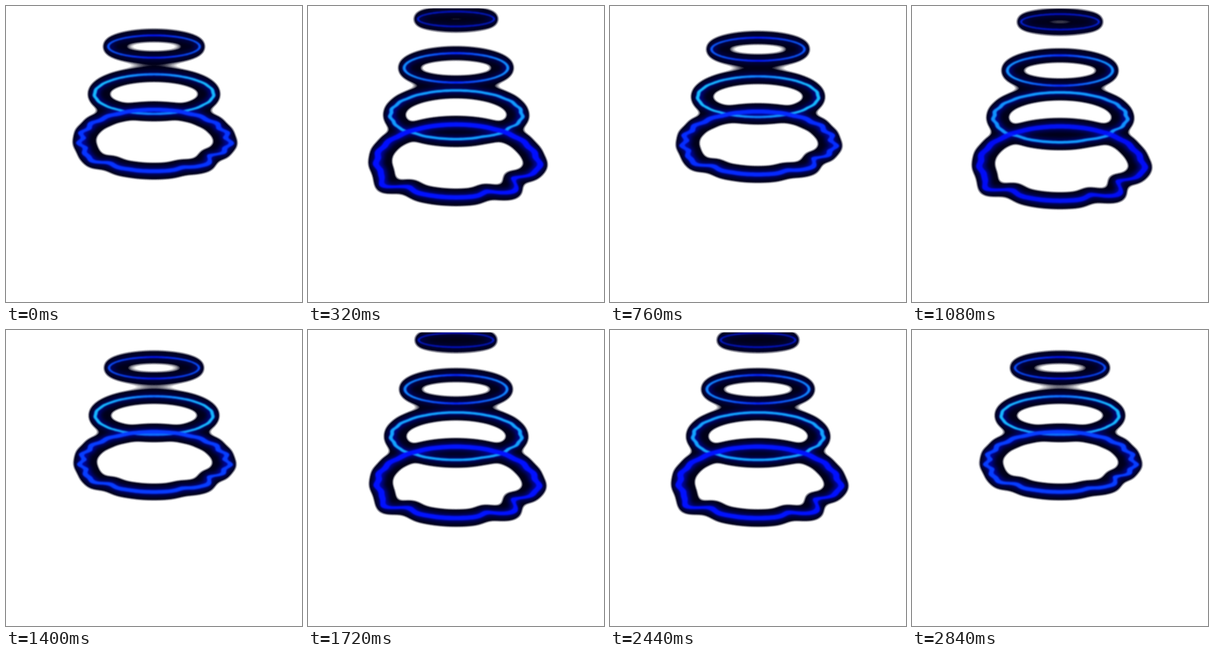
These frames come from a looping animation (500x500 px, 2.88 s). An HTML page:

```html
<!DOCTYPE html>
<html lang="en">
<head>
<meta charset="utf-8">
<title>Falling rings</title>
<style>
  html, body { margin: 0; width: 100%; height: 100%; overflow: hidden; background: #fff; }
  svg { display: block; width: 100%; height: 100%; }
  .light { mix-blend-mode: screen; }
</style>
</head>
<body>
<svg viewBox="0 0 500 500">
  <defs>
    <clipPath id="stage"><rect y="4" width="500" height="496"/></clipPath>
    <!-- blur followed by a steep alpha ramp gives the dark halo its edge -->
    <filter id="halo" filterUnits="userSpaceOnUse" x="0" y="-60" width="500" height="560" color-interpolation-filters="sRGB">
      <feGaussianBlur stdDeviation="8"/>
      <feComponentTransfer><feFuncA type="linear" slope="8" intercept="-1"/></feComponentTransfer>
    </filter>
    <filter id="glow" filterUnits="userSpaceOnUse" x="0" y="-60" width="500" height="560" color-interpolation-filters="sRGB">
      <feGaussianBlur stdDeviation="5"/>
    </filter>
    <filter id="soft" filterUnits="userSpaceOnUse" x="0" y="-60" width="500" height="560" color-interpolation-filters="sRGB">
      <feGaussianBlur stdDeviation="0.9"/>
    </filter>
  </defs>
  <rect width="500" height="500" fill="#fff"/>
  <g clip-path="url(#stage)"><g id="halos" filter="url(#halo)" fill="#000018"/></g>
  <g class="light" clip-path="url(#stage)"><g id="glows" filter="url(#glow)" fill="#0008d8"/></g>
  <g class="light" clip-path="url(#stage)"><g id="lines" filter="url(#soft)"/></g>
</svg>
<script>
const STEP = 40, SPACING = 18, RINGS = 4, LIFE = 71;

// bulges and dents of an old ring: angle in degrees, clockwise from the right
const LOBES = [
  { at: 10, height: .06, width: 16 },
  { at: 33, height: -.13, width: 9 },
  { at: 49, height: .11, width: 9 },
  { at: 65, height: -.08, width: 6 },
  { at: 131, height: -.07, width: 8 },
  { at: 144, height: .15, width: 8 }
];

const clamp = x => Math.max(0, Math.min(1, x));
const ramp = (x, from, to) => clamp((x - from) / (to - from));
const bell = (x, centre, before, after = before) =>
  Math.exp(-(((x - centre) / (x < centre ? before : after)) ** 2));

const POINTS = Array.from({ length: 180 }, (_, i) => {
  const deg = i * 2, angle = deg * Math.PI / 180, x = Math.cos(angle);
  return {
    x, y: Math.sin(angle),
    bump: LOBES.reduce((sum, l) => sum + l.height * bell((deg - l.at + 540) % 360, 180, l.width), 0),
    ripple: Math.sin(19 * angle) * x * x
  };
});

function ringAt(age) {
  const u = age - 7, rx = 54 + 1.29 * age, wide = ramp(age, 44, 56);
  const bend = Math.sin(Math.PI * clamp(u / 55) ** .7);
  const blue = 185 + 70 * ramp(age, 4, 20);
  const color = green => `rgb(${green * .12},${green},${blue})`;
  return {
    rx, ry: rx * (.19 + .0049 * u), cy: 17 + 4.45 * u + 3 * bend,
    top: 2.1 + .05 * age + 2 * wide,
    side: 2.6 + .09 * age + 2 * wide,
    halo: 6.5 + .15 * age,
    glow: .4 + .45 * ramp(age, 8, 54),
    distort: ramp(age, 30, 62) ** 2,
    ripple: .01 * ramp(age, 26, 44) + .022 * bell(age, 54, 6),
    opacity: ramp(age, .5, 6.5) * (age < LIFE ? 1 - .7 * ramp(age, 62, 70) : 0),
    topColor: color(16 + 145 * bell(age, 44, 13, 8)),
    sideColor: color(185 * bell(age, 38, 22, 14))
  };
}

function outline(ring, dx, dy) {
  return "M" + POINTS.map(p => {
    const r = 1 + p.bump * ring.distort + p.ripple * ring.ripple;
    const x = 250 + p.x * (ring.rx * r + dx);
    const y = ring.cy + p.y * (ring.ry * r + dy);
    return x.toFixed(2) + " " + y.toFixed(2);
  }).join("L") + "Z";
}

// closed band around the ring; inset widens it inwards at the sides
const band = (ring, side, top, inset = 0) =>
  outline(ring, side / 2, top / 2) + outline(ring, -side / 2 - inset, -top / 2);

function add(parent, tag, attrs = {}) {
  const node = document.createElementNS("http://www.w3.org/2000/svg", tag);
  set(node, attrs);
  return parent.appendChild(node);
}

function set(node, attrs) {
  for (const key in attrs) node.setAttribute(key, attrs[key]);
}

const addBand = (id, attrs) =>
  add(document.getElementById(id), "path", { "fill-rule": "evenodd", ...attrs });

const rings = Array.from({ length: RINGS }, (_, i) => {
  const gradient = add(document.querySelector("defs"), "linearGradient", { id: "hue" + i });
  return {
    stops: [0, .1, .5, .9, 1].map(offset => add(gradient, "stop", { offset })),
    halo: addBand("halos"),
    glow: addBand("glows"),
    line: addBand("lines", { fill: `url(#hue${i})` })
  };
});

function drawRing(nodes, age) {
  const ring = ringAt(age), { side, top, halo, opacity } = ring;
  nodes.stops.forEach((stop, i) => set(stop, { "stop-color": i === 2 ? ring.topColor : ring.sideColor }));
  set(nodes.halo, { d: band(ring, halo, halo, 10), opacity });
  set(nodes.glow, { d: band(ring, side + 2, top + 2, 3), opacity: ring.glow * opacity });
  set(nodes.line, { d: band(ring, side, top), opacity });
}

let shown = -1;
function draw() {
  const phase = Math.floor(performance.now() / STEP) % SPACING;
  if (phase !== shown) {
    rings.forEach((nodes, i) => drawRing(nodes, phase + i * SPACING));
    shown = phase;
  }
  requestAnimationFrame(draw);
}
draw();
</script>
</body>
</html>
```
